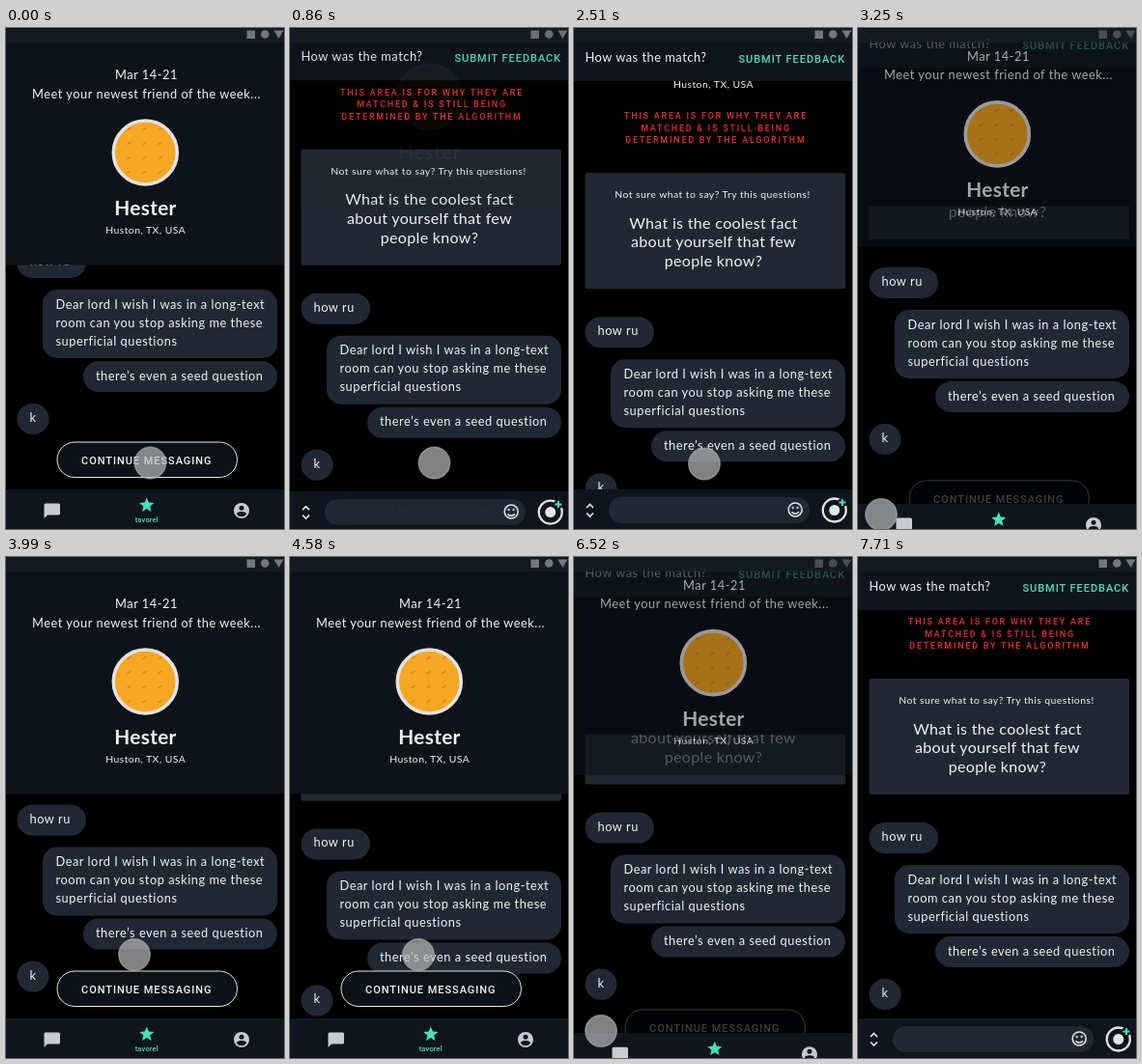
These frames come from a looping animation (288 by 519 pixels, 8.03 s). An HTML page:

```html
<!DOCTYPE html>
<html lang="en">
<head>
<meta charset="utf-8">
<title>Weekly match</title>
<style>
  html, body { margin: 0; width: 100%; height: 100%; overflow: hidden; background: #000; }
  svg { display: block; width: 288px; height: 519px; }
  text { font: 12.8px Lato, sans-serif; letter-spacing: .53px; fill: #f1f2f4; }
  .mid { text-anchor: middle; }
  .small { font-size: 10.4px; letter-spacing: .45px; }
  .ask { font-size: 16px; letter-spacing: .33px; }
  .name { font-size: 20.8px; font-weight: 700; letter-spacing: .3px; }
  .caps { font: 500 11px Roboto, sans-serif; letter-spacing: .95px; }
  .why { font: 500 9px Roboto, sans-serif; letter-spacing: 1.75px; fill: #e5302f; }
  .tab { font: 500 7.5px Roboto, sans-serif; letter-spacing: .2px; }
  .mint { fill: #45e0bd; }
  .panel { fill: #222833; }
  .bar { fill: #10141d; }
  .icon { fill: #c9cbcf; }
  .line { fill: none; stroke: #e4e5e7; stroke-width: 1.6; }
  .ring { stroke-width: 2.3; }
</style>
</head>
<body>
<svg viewBox="0 0 288 519">
  <defs>
    <clipPath id="view"><rect id="window" width="288" height="519"/></clipPath>
    <pattern id="dots" x="120" y="95" width="16" height="15" patternUnits="userSpaceOnUse">
      <path d="M6 10.5l3-2" stroke="#d08a1c" stroke-width="1.4" stroke-linecap="round"/>
    </pattern>
  </defs>

  <g clip-path="url(#view)">
    <g id="list">
      <text class="small mid" x="144.5" y="55.5">Huston, TX, USA</text>
      <g class="mid">
        <text class="why" x="147" y="88">THIS AREA IS FOR WHY THEY ARE</text>
        <text class="why" x="147" y="100.5">MATCHED &amp; IS STILL BEING</text>
        <text class="why" x="147" y="113">DETERMINED BY THE ALGORITHM</text>
      </g>
      <rect class="panel" x="11.5" y="144" width="269.5" height="120" rx="2"/>
      <g class="mid">
        <text class="small" x="143.5" y="170">Not sure what to say? Try this questions!</text>
        <text class="ask" x="144.5" y="201.5">What is the coolest fact</text>
        <text class="ask" x="144.5" y="221">about yourself that few</text>
        <text class="ask" x="144.5" y="241">people know?</text>
      </g>
      <g class="panel">
        <rect x="11.5" y="293" width="71.5" height="32" rx="16"/>
        <rect x="38" y="337" width="243" height="71" rx="15"/>
        <rect x="80" y="411" width="201" height="32" rx="16"/>
        <rect x="11.5" y="455" width="33" height="32" rx="16"/>
      </g>
      <text x="24.5" y="312">how ru</text>
      <text x="51.5" y="356.5">Dear lord I wish I was in a long-text</text>
      <text x="51.5" y="375.5">room can you stop asking me these</text>
      <text x="51.5" y="394.5">superficial questions</text>
      <text x="93" y="430.5">there’s even a seed question</text>
      <text x="24.5" y="474">k</text>
    </g>
  </g>

  <g id="chatTop">
    <rect class="bar" y="-20" width="288" height="75"/>
    <text x="11.5" y="35">How was the match?</text>
    <text class="caps mint" x="170.5" y="35.5">SUBMIT FEEDBACK</text>
  </g>

  <g id="homeTop">
    <rect y="-20" width="288" height="265.5" fill="#0e131a"/>
    <g class="mid">
      <text x="145.5" y="53">Mar 14-21</text>
      <text x="145.5" y="72.5">Meet your newest friend of the week...</text>
      <text class="name" x="144.5" y="194">Hester</text>
      <text class="small" x="144.7" y="213">Huston, TX, USA</text>
    </g>
    <circle cx="144.3" cy="129" r="33" fill="#f6a724"/>
    <circle cx="144.3" cy="129" r="33" fill="url(#dots)" stroke="#e2e2e4" stroke-width="3.6"/>
  </g>

  <rect width="288" height="15" fill="#171c25" opacity=".75"/>
  <g id="status" fill="#74777c">
    <rect x="249.5" y="2.5" width="8.5" height="8.5"/>
    <circle cx="268.3" cy="6.5" r="4.3"/>
    <path d="M277.5 2.5h10l-5 8.5z"/>
  </g>

  <g id="chatBar">
    <rect class="bar" y="478" width="288" height="42"/>
    <path class="line" d="M13 497l3.500-3.500 3.500 3.500M13 502.500l3.500 3.500 3.500-3.500"/>
    <rect class="panel" x="36" y="486" width="208" height="27" rx="13.5"/>
    <circle class="line" cx="229.2" cy="499" r="7"/>
    <path class="line" d="M225.5 501.3q3.7 4 7.4 0"/>
    <circle class="icon" cx="226.7" cy="497" r="1.2"/>
    <circle class="icon" cx="231.7" cy="497" r="1.2"/>
    <circle class="line ring" cx="269.8" cy="499.5" r="12"/>
    <circle cx="269.8" cy="499.5" r="5.5" fill="#e4e5e7"/>
    <circle class="bar" cx="278" cy="491.5" r="4.8"/>
    <path d="M278 488v7M274.5 491.5h7" stroke="#45e0bd" stroke-width="2"/>
  </g>

  <g id="button">
    <rect x="53" y="429" width="186.5" height="36.5" rx="18.2" fill="#0d1118" stroke="#e4e5e7"/>
    <text class="caps" x="78" y="452">CONTINUE MESSAGING</text>
  </g>

  <g id="nav">
    <rect class="bar" y="478" width="288" height="42"/>
    <path class="icon" d="M41 492.500h13.500q1.500 0 1.500 1.500v9q0 1.500-1.500 1.500H43l-3.500 3.500v-14q0-1.500 1.500-1.500z"/>
    <path id="star" class="mint"/>
    <text class="tab mint mid" x="145.8" y="511.5">tavorel</text>
    <circle class="icon" cx="244" cy="500" r="8"/>
    <circle class="bar" cx="244" cy="497.200" r="2.500"/>
    <path class="bar" d="M239 503.700q0-2.700 5-2.700t5 2.700q-1.800 2.500-5 2.500t-5-2.500z"/>
  </g>

  <circle id="touch" r="16.2" fill="#bebebe" fill-opacity=".68" stroke="#aaa" stroke-opacity=".7" stroke-width="1.4"/>
</svg>

<script>
  const LOOP = 8030, FIRST = 270, STEP = 148.6, SWITCH = 450;

  // Taps that swap the profile and the chat view.
  const taps = [500, 3150, 5490, 6420, 7200];

  // Pulls on the list that spring back to rest.
  const pulls = [
    { from: 1770, to: 2950, by: 26 },
    { from: 3690, to: 5322, by: 55 },
    { from: 6380, to: 6900, by: 23 }
  ];

  const home = { x: 149.5, y: 450.5 };
  const moves = [
    { from: 1440, to: 1600, x: 135, y: 451.5 },
    { from: 2700, to: 2940, x: 24, y: 504 },
    { from: 3250, to: 3530, x: 133, y: 412 },
    { from: 5020, to: 5320, x: 135, y: 440 },
    { from: 5770, to: 6210, x: 28, y: 491 },
    { from: 6660, to: 7100, x: 149.5, y: 450.5 },
    { from: 7260, to: 7540, x: 185, y: 540 }
  ];

  const el = id => document.getElementById(id);
  const part = (t, from, to) => Math.min(1, Math.max(0, (t - from) / (to - from)));
  const mix = (a, b, k) => a + (b - a) * k;
  const easeOut = k => 1 - (1 - k) ** 5;
  const smooth = k => k * k * (3 - 2 * k);

  // 0 = profile, 1 = chat
  const viewAt = t => taps.reduce(
    (p, tap, i) => mix(p, (i + 1) % 2, easeOut(part(t, tap, tap + SWITCH))), 0);

  function scrollAt(t, p) {
    const rest = -18 - 48 * (1 - p) ** 1.5;
    return pulls.reduce((y, d) => y + d.by * Math.sin(Math.PI * part(t, d.from, d.to)), rest);
  }

  const fingerAt = t => moves.reduce((at, m) => {
    const k = smooth(part(t, m.from, m.to));
    return { x: mix(at.x, m.x, k), y: mix(at.y, m.y, k) };
  }, home);

  function place(id, y, opacity = 1, x = 0) {
    el(id).setAttribute("transform", `translate(${x} ${y})`);
    el(id).setAttribute("opacity", opacity);
  }

  function draw(t) {
    const p = viewAt(t), finger = fingerAt(t);
    const away = p ** .25;
    place("list", scrollAt(t, p));
    el("window").setAttribute("y", mix(245, 55, p));
    place("chatTop", -20 * (1 - p));
    place("homeTop", -60 * p, 1 - p);
    place("chatBar", 54 * (1 - p));
    place("button", 53 * away, 1 - away);
    place("nav", 47 * p);
    place("status", 0, 1 - 2 * p * (1 - p));
    place("touch", finger.y, 1, finger.x);
  }

  const points = Array.from({ length: 10 }, (_, i) => {
    const r = i % 2 ? 3.6 : 8, a = i * Math.PI / 5;
    return [145.8 + r * Math.sin(a), 494.5 - r * Math.cos(a)];
  });
  el("star").setAttribute("d", `M${points.join("L")}Z`);

  // The picture advances in even steps, like a low-rate screen capture.
  const start = performance.now();
  function tick(now) {
    const t = Math.max(0, now - start) % LOOP;
    draw(t < FIRST ? 0 : FIRST + Math.floor((t - FIRST) / STEP) * STEP);
    requestAnimationFrame(tick);
  }
  tick(start);
</script>
</body>
</html>
```
